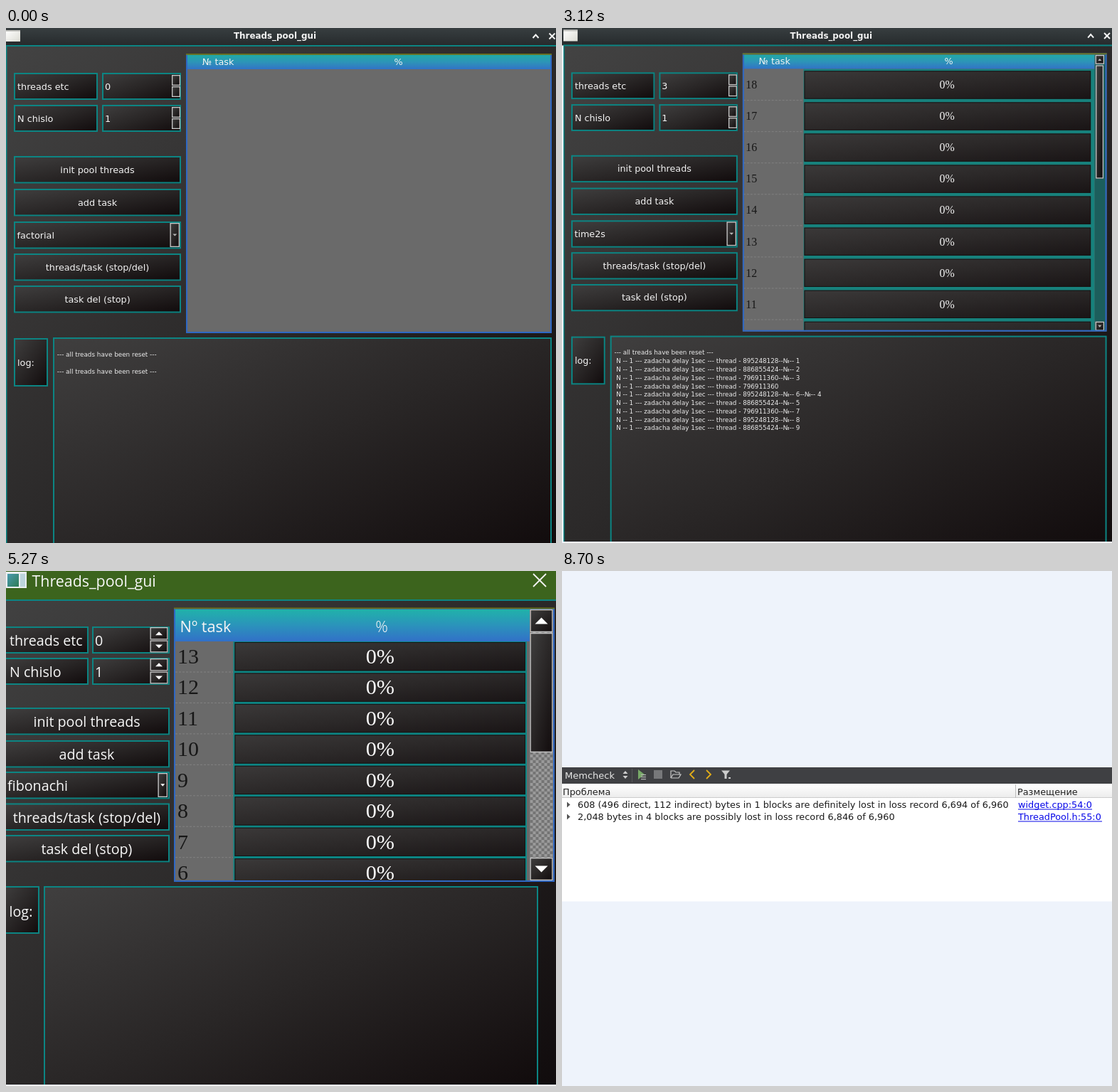
Recreate the animation shown at these times as an HTML page with a canvas. Size 773 by 724 pixels, loop 9.51 s.

```html
<!DOCTYPE html>
<html lang="en">
<head>
<meta charset="utf-8">
<title>Threads_pool_gui</title>
<style>
html, body { margin: 0; width: 100%; height: 100%; overflow: hidden; background: #eef3fb; }
canvas { display: block; }
</style>
</head>
<body>
<canvas id="stage" width="773" height="724"></canvas>
<script>
const ctx = document.getElementById('stage').getContext('2d');
const W = 773, H = 724, LOOP = 9510;
const PALE = '#eef3fb', TEAL = '#0c8583', BLUE = '#2f68c4', GREY = '#6a6a6a';
const DARK = ['#403f3f', '#292626', '#100a0b'];
const IDLE = ['#3b3939', '#2b2828', '#191415'];
const SANS = '"DejaVu Sans", sans-serif';
const OPEN = '"Open Sans", sans-serif';
const SERIF = '"Liberation Serif", serif';

function fill(x, y, w, h, color) {
  ctx.fillStyle = color;
  ctx.fillRect(x, y, w, h);
}

function frame(x, y, w, h, color, line = 2) {
  ctx.strokeStyle = color;
  ctx.lineWidth = line;
  ctx.strokeRect(x + line / 2, y + line / 2, w - line, h - line);
}

// Gradient stretched over the unit square of the box
function shade(x, y, w, h, colors, dx = 1, dy = 1) {
  ctx.save();
  ctx.translate(x, y);
  ctx.scale(w, h);
  const g = ctx.createLinearGradient(0, 0, dx, dy);
  colors.forEach((c, i) => g.addColorStop(i / (colors.length - 1), c));
  fill(0, 0, 1, 1, g);
  ctx.restore();
}

function panel(x, y, w, h, border = TEAL, line = 2) {
  shade(x, y, w, h, DARK);
  frame(x, y, w, h, border, line);
}

// y is the middle of the capitals
function text(s, x, y, size, family, color = '#f4f4f4', align = 'left', weight = 'normal') {
  ctx.font = `${weight} ${size}px ${family}`;
  ctx.fillStyle = color;
  ctx.textAlign = align;
  ctx.fillText(s, x, y + size * (family === SERIF ? 0.33 : 0.36));
}

// Labels of the second window are a little heavier
function label(s, x, y, size = 19.7, align = 'left') {
  text(s, x, y, size, OPEN, '#f8f8f8', align, 500);
}

function line(points, color, width) {
  ctx.beginPath();
  points.forEach(([x, y]) => ctx.lineTo(x, y));
  ctx.strokeStyle = color;
  ctx.lineWidth = width;
  ctx.stroke();
}

// Points up; a negative ry points down
function triangle(cx, cy, rx, ry, color) {
  ctx.beginPath();
  ctx.moveTo(cx - rx, cy + ry);
  ctx.lineTo(cx + rx, cy + ry);
  ctx.lineTo(cx, cy - ry);
  ctx.fillStyle = color;
  ctx.fill();
}

function clipped(x, y, w, h, draw) {
  ctx.save();
  ctx.beginPath();
  ctx.rect(x, y, w, h);
  ctx.clip();
  draw();
  ctx.restore();
}

function cross(cx, cy, r, width) {
  line([[cx - r, cy - r], [cx + r, cy + r]], '#f4f4f4', width);
  line([[cx - r, cy + r], [cx + r, cy - r]], '#f4f4f4', width);
}

function dashes(x1, x2, y) {
  ctx.setLineDash([3, 2]);
  line([[x1, y], [x2, y]], '#818181', 1);
  ctx.setLineDash([]);
}

function arrowBox(x, y, w, h, dir, rx, ry) {
  panel(x, y, w, h, '#c9c9c9', 1.3);
  if (dir) triangle(x + w / 2, y + h / 2, rx, dir * ry, '#fff');
}

function bar(x, y, w, h, done, colors) {
  if (done) shade(x, y, w, h, colors, 0, 1);
  else shade(x, y, w, h, IDLE);
  frame(x, y, w, h, done ? '#10304a' : '#151515', 1);
}

const BUTTONS = ['init pool threads', 'add task', null, 'threads/task (stop/del)', 'task del (stop)'];

function linux(o) {
  ctx.save();
  ctx.translate(o.x, o.y);
  ctx.scale(o.s, o.s);
  shade(-5, -5, 790, 30, ['#3b4244', '#262a2c'], 0, 1);
  shade(0, 25, 776, 715, ['#434343', '#2b2929', '#100b0c']);
  fill(0, 24, 776, 2, TEAL);
  fill(0, 25, 1.5, 715, TEAL);
  shade(0, 3, 20, 16, ['#ffffff', '#dcdcd4']);
  fill(0, 3, 20, 2, '#c6c6c2');
  text('Threads_pool_gui', 378, 11, 11.9, SANS, '#f2f2f2', 'center', 'bold');
  line([[740.5, 14], [744.5, 9.5], [748.5, 14]], '#f4f4f4', 2);
  cross(767.5, 11.5, 4, 2);

  [['threads etc', o.threads, 63], ['N chislo', o.n, 108]].forEach(([name, value, y]) => {
    panel(11, y, 118, 38);
    text(name, 16, y + 19, 12.8, SANS);
    panel(135, y, 111, 38);
    text(value, 139, y + 19, 12.8, SANS);
    arrowBox(233, y + 3, 12, 15);
    arrowBox(233, y + 19, 12, 15);
  });
  [180, 226, 272, 317, 362].forEach((y, i) => {
    panel(11, y, 235, 38.5);
    if (BUTTONS[i]) text(BUTTONS[i], 128.5, y + 19, 12.8, SANS, '#f4f4f4', 'center');
    else {
      text(o.job, 15.5, y + 19, 12.8, SANS);
      arrowBox(230.5, y + 2, 13.5, 34);
      triangle(237.3, y + 19, 3, -1.5, '#b5b5b5');
    }
  });
  linuxTable(o);

  panel(11, 436, 48, 68);
  text('log:', 16, 470, 12.8, SANS);
  panel(66, 435, 701, 310);
  o.log.forEach((s, i) => {
    text(s, s[0] === 'N' ? 74.5 : 71.8, 446.9 + i * 11.83, 8.8, SANS, '#ececec');
  });
  ctx.restore();
}

function linuxTable(o) {
  const full = o.top > 0;
  const right = full ? 750 : 766;
  fill(253, 36, 514, 393, GREY);
  if (full) clipped(254, 58, 512, 370, () => {
    fill(339, 58, 411, 371, '#17817c');
    for (let i = 0; i < 9; i++) {
      const y = 61 + i * 44.25, id = o.top - i;
      const done = i >= o.idle;
      bar(340, y, 404.5, 39.5, done, ['#3da6ee', '#3aa0e6', '#2f87c3']);
      text(id, 257.5, y + 19.8, 16, SERIF, '#171717');
      text(done ? '100%' : '0%', 541.5, y + 19.8, 16, SERIF, '#f4f4f4', 'center');
      dashes(254, 338, y + 41.5);
    }
  });
  shade(254, 38, right - 254, 20, ['#20aaa6', '#2d94b8', '#3273c6'], 0, 1);
  text('№ task', 276, 47.5, 12.8, SANS);
  text('%', full ? 544 : 551.5, 47.5, 12.8, SANS, '#f4f4f4', 'center');
  if (full) {
    fill(750, 38, 16, 390, '#1c5e5c');
    arrowBox(751, 38.5, 12.5, 13);
    triangle(757.2, 45, 2.5, 1.5, '#bbb');
    arrowBox(751.5, 53, 11, o.thumb);
    arrowBox(751, 415, 12.5, 13);
    triangle(757.2, 421.5, 2.5, -1.5, '#bbb');
  }
  frame(253, 36, 514, 393, BLUE);
  fill(253, 36, 514, 1.8, '#6d7415');
}

function windows(o) {
  ctx.save();
  ctx.translate(o.x, o.y);
  ctx.scale(o.s, o.s);
  ctx.beginPath();
  ctx.rect(0, -10, o.w, 800);
  ctx.clip();
  fill(0, -10, 776, 50, '#3c641d');
  shade(0, 40, 776, 700, ['#414141', '#2a2828', '#100b0c']);
  fill(0, 40, 776, 2, TEAL);
  fill(0, 1, 29, 23, '#e9eef0');
  shade(2, 4, 16, 18, ['#4a9bb0', '#2f7b55']);
  fill(20, 4, 7, 18, '#bcd5dc');
  label('Threads_pool_gui', 36.5, 14, 21.4);
  cross(750, 13, 9, 1.8);

  [['threads etc', o.threads, 78], ['N chislo', o.n, 122]].forEach(([name, value, y]) => {
    panel(-4, y, 120, 38);
    label(name, 5, y + 20);
    panel(121, y, 109, 38);
    label(value, 125, y + 20);
    arrowBox(202.5, y + 1, 25, 17.5, 1, 5, 2.5);
    arrowBox(202.5, y + 19.5, 25, 17, -1, 5, 2.5);
  });
  [192, 238, 282, 326.5, 371].forEach((y, i) => {
    panel(-4, y, 234, 38.5);
    if (BUTTONS[i]) label(BUTTONS[i], 113.5, y + 20, 19.7, 'center');
    else {
      label('fibonachi', 2, y + 20);
      arrowBox(213.5, y + 2, 13.5, 34, -1, 3, 1.8);
    }
  });
  windowsTable(o);

  panel(-4, 443, 51, 67);
  label('log:', 4.5, 479);
  panel(53, 443, 695, 291);
  clipped(55, 445, 690, 287, () => {
    o.log.forEach((s, i) => {
      label(s.replace('№', 'Nº'), s[0] === 'N' ? 64 : 59, 450.5 + i * 24.08, 18.5);
    });
    if (o.log.length) scrollBar(714.5, 445, 286, 664, 33);
  });
  ctx.restore();
}

function scrollBar(x, y, h, thumbY, thumbH) {
  const cell = 4;
  fill(x, y, 32, h, '#9a9a9a');
  for (let row = 0; row * cell < h; row++)
    for (let col = row % 2; col < 8; col += 2)
      fill(x + col * cell, y + row * cell, cell, cell, '#747474');
  arrowBox(x, y, 32, 32, 1, 9, 4.5);
  arrowBox(x, thumbY, 32, thumbH);
  arrowBox(x, y + h - 32, 32, 32, -1, 9, 4.5);
}

function windowsTable(o) {
  fill(236, 52, 535, 385, GREY);
  clipped(238, 54, 531, 381, () => {
    fill(319.5, 98, 412.5, 340, TEAL);
    for (let i = 0; i < 8; i++) {
      const y = 100 + i * 43.45;
      bar(321.5, y, 408.5, 40.3, o.done, ['#08b226', '#08b025']);
      text(o.top - i, 241, y + 20, 30, SERIF, '#171717');
      text(o.done ? '100%' : '0%', 525.8, y + 20, 30.2, SERIF, '#fafafa', 'center');
      dashes(238, 319, y + 42);
    }
    shade(238, 54, 498, 45, ['#20b2aa', '#2b93bb', '#3270c8'], 0, 1);
    text('Nº task', 244.5, 78, 21.8, OPEN, '#f4f4f4');
    text('%', 528, 78, 21.8, OPEN, '#f4f4f4', 'center', 300);
    scrollBar(736.5, 54, 381, 87, o.thumb);
  });
  frame(236, 52, 535, 385, BLUE);
  fill(236, 51.5, 535, 1.8, '#6d7415');
}

function memcheck() {
  fill(0, 276, W, 23, '#3f4043');
  text('Memcheck', 4, 287, 13, SANS, '#e6e6e6');
  triangle(89, 283, 3.5, 2, '#cfcfcf');
  triangle(89, 290, 3.5, -2, '#cfcfcf');
  fill(98, 278, 1, 19, '#57585a');
  ctx.beginPath();
  ctx.moveTo(107, 279);
  ctx.lineTo(116, 286);
  ctx.lineTo(107, 293);
  ctx.fillStyle = '#78a968';
  ctx.fill();
  [286, 289, 292].forEach(y => fill(111, y, 7, 1.2, '#b8b8b8'));
  fill(129, 280, 12, 12, '#77787a');
  line([[153, 291], [153, 281], [158, 281], [160, 283], [165, 283], [165, 286]], '#c8c8c8', 1.2);
  line([[153, 291], [156, 286], [167, 286], [164, 291], [153, 291]], '#c8c8c8', 1.2);
  line([[186, 280], [180, 286], [186, 292]], '#e3ad18', 1.8);
  line([[203, 280], [209, 286], [203, 292]], '#e3ad18', 1.8);
  triangle(230, 284, 6, -3.5, '#cdcdcd');
  fill(228.5, 284, 3, 8, '#cdcdcd');
  fill(234, 290, 3, 2, '#cdcdcd');

  shade(0, 299, W, 20, ['#ffffff', '#ececec'], 0, 1);
  fill(0, 318, W, 1, '#cccccc');
  fill(0, 319, W, 145.5, '#ffffff');
  fill(637, 300, 1, 19, '#bdbdbd');
  text('Проблема', 1, 310, 12.85, SANS, '#222');
  text('Размещение', 640, 310, 12.85, SANS, '#222');
  [
    ['608 (496 direct, 112 indirect) bytes in 1 blocks are definitely lost in loss record 6,694 of 6,960', 'widget.cpp:54:0', 104],
    ['2,048 bytes in 4 blocks are possibly lost in loss record 6,846 of 6,960', 'ThreadPool.h:55:0', 118]
  ].forEach(([issue, place, w], i) => {
    const y = 328.5 + i * 17;
    ctx.beginPath();
    ctx.moveTo(7, y - 4);
    ctx.lineTo(11.5, y);
    ctx.lineTo(7, y + 4);
    ctx.fillStyle = '#555';
    ctx.fill();
    text(issue, 22, y, 12.85, SANS, '#1b1b1b');
    text(place, 641, y, 12.85, SANS, '#0808e8');
    fill(641, y + 6, w, 1, '#0808e8');
  });
}

const reset = n => Array(n).fill(['', '--- all treads have been reset ---']).flat();
const solved = (job, rest) => `N -- 1 --- zadacha ${job} --- answer_1 --- thread - ${rest}`;
const waits = id => `init thread --- ${id} --- wait for`;

const quickLog = [
  ...reset(4),
  solved('fibonachi', '-218114304--№-- 2'),
  solved('facktorial', '-234899712'),
  solved('facktorial', '-209721600--№-- 1'),
  solved('fibonachi', '-209721600--№-- 5'),
  solved('fibonachi', '-209721600--№-- 6--№-- 3'),
  solved('fibonachi', '-209721600--№-- 7'),
  solved('facktorial', '-234899712--№-- 8'),
  solved('facktorial', '-209721600--№-- 9'),
  solved('facktorial', '-234899712--№-- 10'),
  solved('fibonachi', '-218114304--№-- 4'),
  ...[-209721600, -226507008, -243292416, -234899712, -251685120, -218114304].map(waits)
];

const pool = { a: '895248128', b: '886855424', c: '796911360' };
const delayLog = [
  ...reset(1),
  ...'a1 b2 c3 c a6--№--_4 b5 c7 a8 b9 a11 b10 b12 c14 a13 b15 a17 c16 b18'.split(' ').map(s => {
    const tail = s.length > 1 ? '--№-- ' + s.slice(1).replace('_', ' ') : '';
    return 'N -- 1 --- zadacha delay 1sec --- thread - ' + pool[s[0]] + tail;
  })
];

const fib = rest => `N -- 5 --- zadacha fibonachi --- answer_5 --- thread - ${rest}`;
const delay = rest => `N -- 5 --- zadacha delay 1sec --- thread - ${rest}`;
const poolLog = [
  fib('12516--№-- 95'), waits(12516), fib('3792--№-- 96'), fib('20260'),
  waits(3792) + '--№-- 97', waits(20260), delay('13504--№-- 82'), delay('15404'),
  waits(13504) + '--№-- 81', delay('6040'), waits(15404) + '--№-- 83', waits(6040)
];

const quick = { x: 1, y: 4.2, s: 0.9965, threads: 6, n: 1, job: 'factorial', top: 10, idle: 0, thumb: 287, log: quickLog };
const timed = { x: 2, y: -0.4, s: 0.9955, threads: 3, n: 1, job: 'time2s', top: 19, idle: 1, thumb: 150, log: [...delayLog, ...reset(1)] };
const busy = { x: 13.2, y: 7.7, s: 0.978, w: 770, threads: 7, n: 5, top: 97, done: true, thumb: 32, log: poolLog };

const SCENES = [
  [0, () => linux({ x: 0, y: 0, s: 1, threads: 0, n: 1, job: 'factorial', top: 0, log: reset(2) })],
  [1020, () => linux({ ...quick, x: 0.5, y: 2.1, s: 0.998, idle: 9, log: reset(4) })],
  [2100, () => linux(quick)],
  [3120, () => linux({ ...timed, top: 18, idle: 9, thumb: 160, log: delayLog.slice(0, 11) })],
  [4080, () => linux(timed)],
  [5270, () => windows({ x: 0, y: 0, s: 1, w: 773, threads: 0, n: 1, top: 13, done: false, thumb: 168, log: [] })],
  [6560, () => windows({ ...busy, x: 7, y: 3.9, s: 0.989, w: 773 })],
  [7620, () => windows(busy)],
  [8700, memcheck]
];

let shown = -1;
const begin = performance.now();

function tick() {
  const t = Math.max(0, performance.now() - begin) % LOOP;
  let k = SCENES.length - 1;
  while (SCENES[k][0] > t) k--;
  if (k !== shown) {
    shown = k;
    fill(0, 0, W, H, PALE);
    clipped(0, 0, W, k < 3 ? H : 722, SCENES[k][1]);
  }
  requestAnimationFrame(tick);
}
tick();
</script>
</body>
</html>
```
